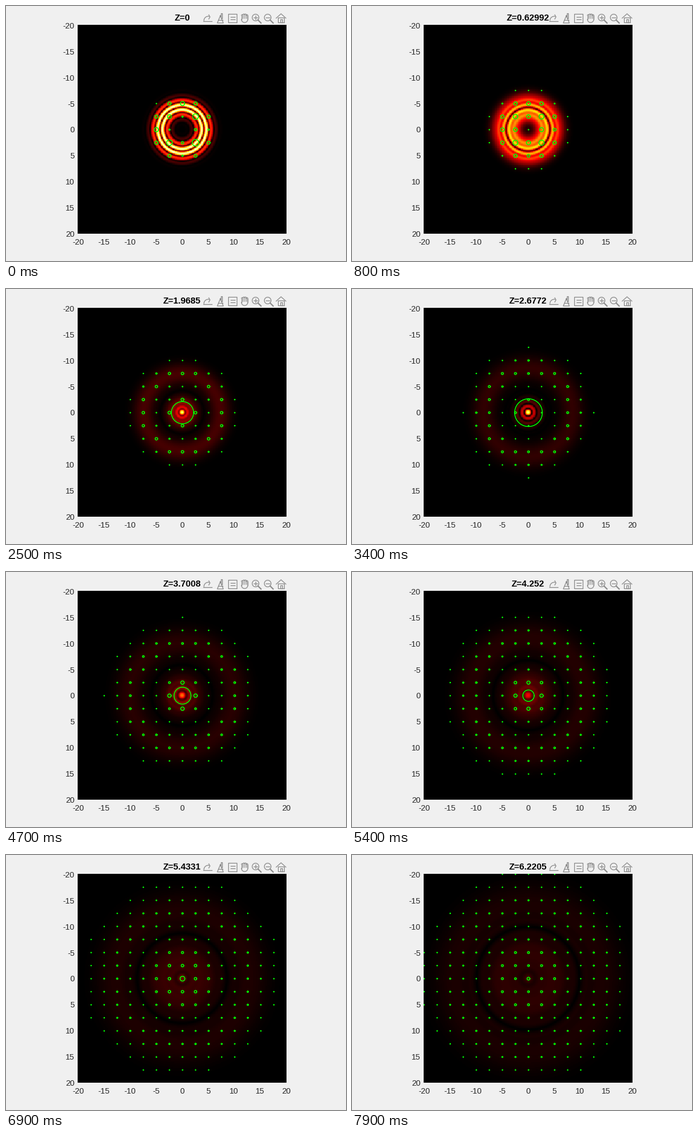
Recreate the animation shown at these times as a matplotlib script. Size 560 by 420 pixels, loop 8 s.

```python
import numpy as np
import matplotlib.pyplot as plt
from matplotlib.animation import FuncAnimation
from matplotlib.collections import LineCollection
from matplotlib.colors import LinearSegmentedColormap

W, H, DPI = 560, 420, 100
PX = 72 / DPI
FRAMES = 80
DZ = 10 / 127
BACK, INK, ICON = "#f0f0f0", "#262626", "#8a8a8a"

# Ring beam: Gaussian envelope at R0 with an odd radial fringe
R0, WIDTH, K0 = 4.2, 1.57, 3.2
N, STEP = 256, 16
DOT_MIN, DOT_SCALE = 0.003, 2.8


def bessel0(x, n=80):
    total = np.zeros_like(x)
    for s in np.sin((np.arange(n) + 0.5) * np.pi / (2 * n)):
        total += np.cos(x * s)
    return total / n


def propagate():
    """Radial amplitude of the beam for every frame (paraxial, Hankel)."""
    r = np.arange(0, 28.9, 0.06)
    k = np.arange(0.0125, 7, 0.025)
    j0 = bessel0(np.outer(r, k))
    start = np.exp(-((r - R0) / WIDTH) ** 2) * np.sin(K0 * (r - R0))
    spectrum = (start * r) @ j0 * 0.06
    z = np.arange(FRAMES) * DZ
    phase = np.exp(-0.25j * np.outer(k**2, z))
    field = j0 @ ((spectrum * k)[:, None] * phase) * 0.025
    return r, np.abs(field).T


r, amps = propagate()
peak = np.maximum.accumulate(amps.max(axis=1))
amps_rel = amps / amps.max()

grid = np.linspace(-20, 20, N)
radius = np.hypot(*np.meshgrid(grid, grid))
px, py = (a.ravel() for a in np.meshgrid(grid[::STEP], grid[::STEP]))
pr = np.hypot(px, py)


def arc(rad, start=0, stop=360):
    t = np.radians(np.linspace(start, stop, 41))
    return rad * np.column_stack([np.cos(t), np.sin(t)])


circle = arc(1)

plt.rcParams["font.family"] = "Liberation Sans"
fig = plt.figure(figsize=(W / DPI, H / DPI), dpi=DPI, facecolor=BACK)
stage = fig.add_axes([0, 0, 1, 1])
stage.set(xlim=(0, W), ylim=(H, 0))
stage.axis("off")

LEFT, TOP, SIDE = 118, 31, 344
ax = fig.add_axes([LEFT / W, 1 - (TOP + SIDE) / H, SIDE / W, SIDE / H])
edge = 20 + 20 / (N - 1)
hot = LinearSegmentedColormap.from_list(
    "heat", [(0, "black"), (0.375, "red"), (0.75, "yellow"), (1, "white")], 256)
image = ax.imshow(np.zeros((N, N)), cmap=hot, vmin=0, vmax=1.05, aspect="auto",
                  extent=(-edge, edge, edge, -edge), interpolation="nearest")
ax.axis("off")
dots = LineCollection([], colors="#00ff00", linewidths=1.5 * PX,
                      capstyle="round")
ax.add_collection(dots, autolim=False)


def label(x, y, text, size, **kw):
    return stage.text(x, y, text, fontsize=size * PX, va="baseline", **kw)


scale = SIDE / (2 * edge)
for v in range(-20, 21, 5):
    label(LEFT + SIDE / 2 + v * scale, 393, str(v), 13.33, color=INK,
          ha="center")
    label(113, TOP + SIDE / 2 + v * scale + 5.5, str(v), 13.33, color=INK,
          ha="right")
title = label(290, 24, "", 14.67, color="black", weight="bold", ha="center")


class Icon:
    """Thin line drawing around a centre point."""

    def __init__(self, x, y=20):
        self.centre = np.array([x, y])

    def path(self, points, shift=(0, 0), lw=1.2):
        xs, ys = (np.asarray(points) + self.centre + shift).T
        stage.plot(xs, ys, color=ICON, lw=lw * PX)

    def line(self, x0, y0, x1, y1, lw=1.2):
        self.path([(x0, y0), (x1, y1)], lw=lw)

    def box(self, w, h, shift=(0, 0)):
        corners = np.sign(arc(1, 45, 405)[::10])
        self.path(corners * (w / 2, h / 2), shift)


def export_icon(icon):
    icon.path(arc(7, 180, 280), (1, 4))
    icon.path(arc(4, -60, 60)[::20], (0, -2))
    icon.line(-7, 5, 7, 5)


def brush_icon(icon):
    icon.box(2.5, 8, (2, -4))
    icon.path(arc(7, -90, 270)[[0, 15, 25, 0]], (0, 3))
    icon.line(-3, 3, 4, 3)


def tip_icon(icon):
    icon.box(14, 14)
    for y in (-2, 2):
        icon.line(-3, y, 4, y)


def hand_icon(icon):
    for i in range(4):
        x, top = 2.6 * i - 3.9, abs(i - 1.5) - 6
        icon.path(arc(1.3, 180, 360), (x, top))
        icon.line(x + 1.3, top, x + 1.3, 0)
    icon.line(-5.2, -4, -5.2, 2)
    icon.path(arc(5.2, 0, 180), (0, 2))
    icon.line(5.2, -4, 5.2, 2)


def lens_icon(icon, plus):
    icon.path(arc(5.5), (-1, -1))
    icon.line(3, 3, 8, 8, lw=2)
    icon.line(-4, -1, 2, -1)
    if plus:
        icon.line(-1, -4, -1, 2)


def home_icon(icon):
    icon.path(arc(8, 180, 360)[::20] * (1, 0.9))
    icon.box(10, 8, (0, 3))
    icon.box(3, 5, (0, 4.5))


export_icon(Icon(332))
brush_icon(Icon(353))
tip_icon(Icon(373))
hand_icon(Icon(393))
lens_icon(Icon(412), True)
lens_icon(Icon(432), False)
home_icon(Icon(453))


def update(i):
    image.set_data(np.interp(radius, r, amps[i]) / peak[i])
    amp = np.interp(pr, r, amps_rel[i])
    dots.set_segments([
        circle * max(a * DOT_SCALE, 0.05) + (x, y)
        for x, y, a in zip(px, py, amp) if a > DOT_MIN])
    title.set_text(f"Z={i * DZ:.5g}")
    return image, dots, title


anim = FuncAnimation(fig, update, frames=FRAMES, interval=100,
                     repeat=True, repeat_delay=0, blit=False)
plt.show()
```
